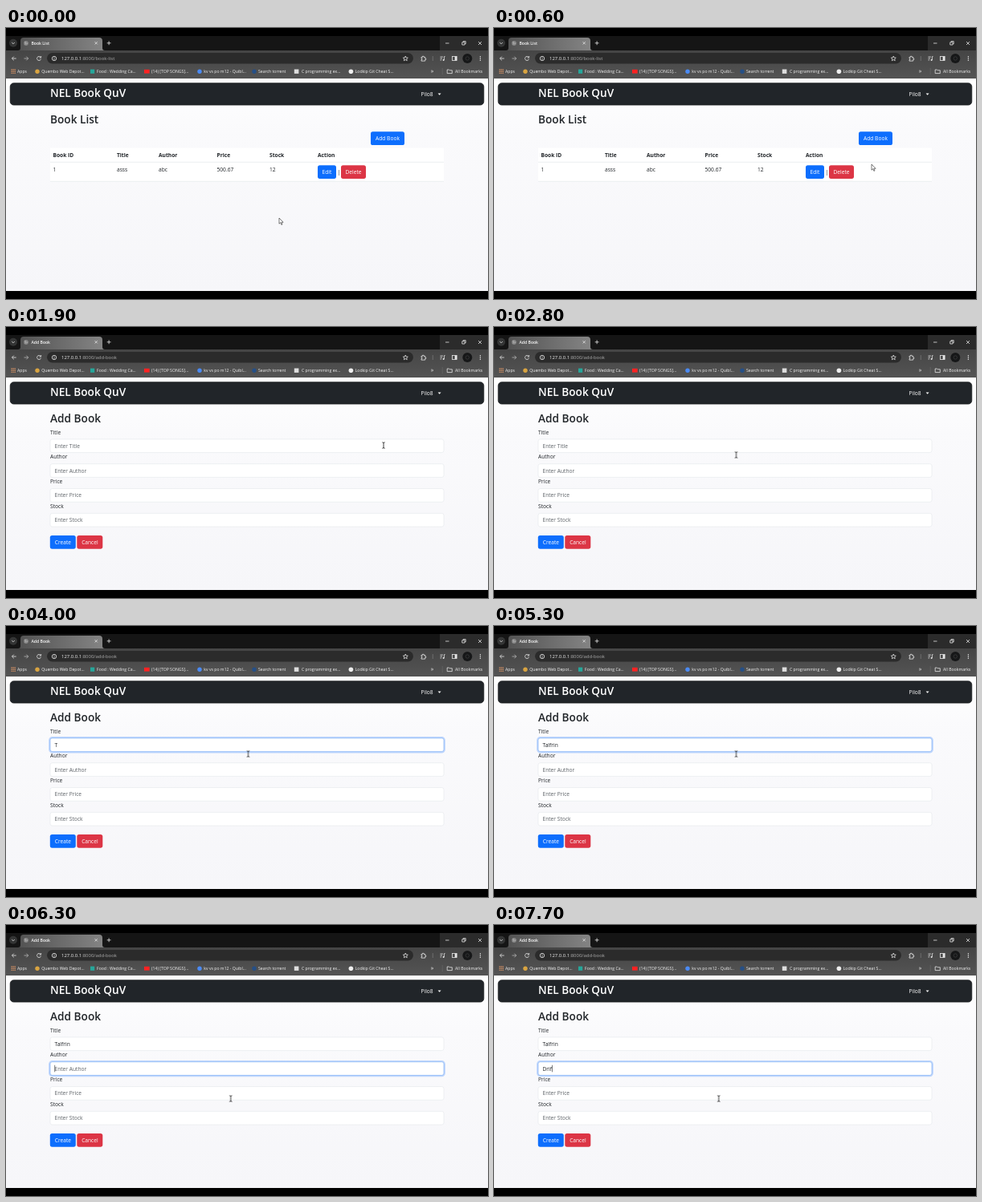
An HTML page for the animation above (8000 ms loop, 600x338 px).

```html
<!DOCTYPE html>
<html lang="en">
<head>
<meta charset="utf-8">
<title>Book form</title>
<style>
  html, body { margin: 0; width: 100%; height: 100%; overflow: hidden; background: #000; }
  svg { display: block; width: 100%; height: 100%; }
  text { font: 6.65px "Open Sans", "Noto Sans", sans-serif; fill: #212529; white-space: pre; }
  .h { font-size: 13.65px; font-weight: 600; }
  .b { font-weight: 700; }
  .w, .btn text { fill: #fff; }
  .btn text { text-anchor: middle; }
  .bar text { font-size: 5.15px; font-weight: 500; fill: #f2f2f2; }
  .url { font-size: 5.95px; fill: #f0f0f0; }
  .dim { fill: #adadad; }
  .tab { font-size: 5.1px; font-weight: 600; fill: #f6f6f6; }
  .hint { fill: #5d6267; }
  .icon { fill: none; stroke: #e6e6e6; stroke-width: .8; }
  .field { fill: #fff; stroke: #dee2e6; stroke-width: .5; }
  .ring { fill: none; stroke: #86b7fe; stroke-width: .6; opacity: 0; }
  .blue { fill: #0d6efd; }
  .red { fill: #dc3545; }

  .list, .form, .arrow, .hand, .beam, #caret { animation: 8s step-end infinite; }
  .list { animation-name: list; }
  .form { animation-name: form; }
  .arrow { animation-name: arrow; }
  .hand { animation-name: hand; }
  .beam { animation-name: form; }
  #caret { animation-name: blink; }
  .pointer { animation: move 8s linear infinite; }
  .add { animation: hover 8s linear infinite; }
  .ring1 { animation: focus1 8s linear infinite; }
  .ring2 { animation: focus2 8s linear infinite; }

  @keyframes list { 0% { visibility: visible } 21.25%, 100% { visibility: hidden } }
  @keyframes form { 0% { visibility: hidden } 21.25%, 100% { visibility: visible } }
  @keyframes arrow { 0% { visibility: visible } 14%, 100% { visibility: hidden } }
  @keyframes hand { 0% { visibility: hidden } 14% { visibility: visible } 21.25%, 100% { visibility: hidden } }
  @keyframes blink {
    0%, 42.5%, 50%, 66.25%, 90% { opacity: 0 }
    38.75%, 46.25%, 62.5%, 70%, 92.5%, 100% { opacity: 1 }
  }
  @keyframes move {
    0%, .6% { transform: translate(340px, 237px) }
    7.5%, 11.5% { transform: translate(470px, 170px) }
    16.25%, 25% { transform: translate(470px, 143px) }
    28.75%, 68.9% { transform: translate(301.5px, 155px) }
    70%, 71.5% { transform: translate(294px, 177px) }
    73.75%, 100% { transform: translate(279.7px, 212px) }
  }
  @keyframes hover { 0%, 14% { fill: #0d6efd } 16%, 19.9% { fill: #0b5ed7 } 20%, 100% { fill: #0a58ca } }
  @keyframes focus1 { 0%, 37% { opacity: 0 } 38.75%, 75.5% { opacity: 1 } 77.2%, 100% { opacity: 0 } }
  @keyframes focus2 { 0%, 75.5% { opacity: 0 } 77.5%, 100% { opacity: 1 } }
</style>
</head>
<body>
<svg viewBox="0 0 600 338" preserveAspectRatio="none">
  <defs>
    <linearGradient id="paper" x2="0" y2="1">
      <stop stop-color="#fff"/><stop offset=".25" stop-color="#fafafc"/><stop offset="1" stop-color="#f6f6f9"/>
    </linearGradient>
    <linearGradient id="toolbar" x2="0" y2="1">
      <stop stop-color="#454545"/><stop offset="1" stop-color="#545454"/>
    </linearGradient>
    <linearGradient id="tabFill"><stop stop-color="#525252"/><stop offset="1" stop-color="#858585"/></linearGradient>
  </defs>
  <rect width="600" height="338"/>

  <!-- Browser window -->
  <g class="bar">
    <rect y="10" width="600" height="19" fill="#151515"/>
    <rect x="540" y="10" width="60" height="18" fill="#2b2b2b"/>
    <rect y="28" width="600" height="35" fill="url(#toolbar)"/>
    <path d="M15 28q3 0 3-3V16q0-4 4-4h94q4 0 4 4v9q0 3 3 3z" fill="url(#tabFill)"/>
    <circle cx="9" cy="18.7" r="5" fill="#343535"/>
    <path class="icon" d="M7.2 18l1.8 1.8 1.8-1.8M110.6 17.2l3.2 3.2m0-3.2l-3.2 3.2M125.7 18.8h4.8m-2.4-2.4v4.8M547 19h4.5M567.8 17.8h3.2V21h-3.2zM569 17.6v-1h3.2v3.2h-1M588 17l4 4m0-4l-4 4"/>
    <circle cx="25" cy="19" r="2.9" fill="#858585"/>
    <path d="M23 17.5l2 .6-.3 1.7-1.4.2M25.5 20l1.7-1.2" class="icon" style="stroke:#b9b9b9"/>
    <rect x="51" y="31" width="456" height="13.5" rx="6.75" fill="#2b2b2b"/>
    <path class="icon" d="M12.7 38H7.5m2.3-2.4L7.4 38l2.4 2.4"/>
    <path class="icon" style="stroke:#b5b5b5" d="M22.5 38h5.2m-2.4-2.4l2.4 2.4-2.4 2.4"/>
    <path class="icon" d="M43 36.4a2.5 2.5 0 1 0 .5 2.2M43.6 35v2h-2"/>
    <circle cx="60" cy="38" r="2.7" class="icon"/><path class="icon" d="M60 37.6v2M60 36.2v.7"/>
    <path class="icon" d="M497.3 35l.9 2 2.1.2-1.6 1.4.5 2.1-1.9-1.1-1.9 1.1.5-2.1-1.6-1.4 2.1-.2z"/>
    <path class="icon" d="M517 36.3h1.5v-1h1.6v1h1.6v1.6h1v1.6h-1v1.6H517v-1.6h.8v-1.6h-.8z"/>
    <path d="M531.3 35v6" stroke="#858585" stroke-width=".6"/>
    <path class="icon" d="M540.5 36h3.4m-3.4 2h2.5m-2.5 2h1.6m3.3 0v-4.4h1.2"/><circle cx="544.6" cy="40" r="1" fill="#e6e6e6"/>
    <rect x="555.5" y="35.5" width="5.6" height="5" class="icon"/><rect x="558.7" y="35.5" width="2.4" height="5" fill="#e6e6e6"/>
    <circle cx="574.3" cy="38" r="6" fill="#161718"/><circle cx="574.3" cy="38" r="2.2" fill="none" stroke="#4d4d4d" stroke-width=".5"/>
    <g fill="#e6e6e6"><circle cx="590.4" cy="35.7" r=".7"/><circle cx="590.4" cy="38" r=".7"/><circle cx="590.4" cy="40.3" r=".7"/></g>

    <path d="M6.5 54.2h5.4M6.5 52h5.4M6.5 56.4h5.4" stroke="#c78b62" stroke-width="1.4" stroke-dasharray="1.4 .6"/>
    <text x="14" y="56">Apps</text>
    <circle cx="39" cy="54.2" r="2.7" fill="#d9a441"/><text x="44.3" y="56">Quembo Web Depot...</text>
    <rect x="105" y="51.6" width="5.2" height="5.2" fill="#26a69a"/><text x="113" y="56">Food : Wedding Ca...</text>
    <rect x="172" y="51.8" width="6.6" height="4.8" fill="#f22"/><text x="181" y="56">(14) [TOP SONGS]...</text>
    <circle cx="241" cy="54.2" r="2.7" fill="#4b8bf4"/><text x="246.3" y="56">kv vs po m12 - Quibl...</text>
    <circle cx="309" cy="54.2" r="2.7" fill="#254f86"/><text x="314" y="56">Search torrent</text>
    <rect x="358.8" y="51.5" width="5.6" height="5.4" fill="#ddd"/><text x="368" y="56">C programming ex...</text>
    <circle cx="429.4" cy="54.2" r="2.8" fill="#eee"/><text x="434.7" y="56">Lodkip Git Cheat S...</text>
    <text x="528.8" y="56" style="font-size:7px">»</text>
    <path d="M543.2 50v8.5" stroke="#707070" stroke-width=".5"/>
    <path class="icon" d="M549.2 52h2.3l.8.8h3v3.8h-6.1z"/><text x="559" y="56">All Bookmarks</text>
  </g>

  <!-- Page -->
  <rect y="63" width="600" height="265" fill="url(#paper)"/>
  <rect x="5.2" y="68.7" width="589.6" height="27.4" rx="4.4" fill="#212529" stroke="#101315" stroke-width=".7"/>
  <text class="h w" x="55" y="86.2">NEL Book QuV</text>
  <text class="w" x="516.5" y="85">Pilo8</text>
  <path d="M537.6 81.6h4l-2 2.1z" fill="#fff"/>

  <g class="list">
    <text class="tab" x="31.5" y="20.8">Book List</text>
    <text class="url" x="69" y="40.1">127.0.0.1<tspan class="dim">:8000/book-list</tspan></text>
    <text class="h" x="55" y="118.9">Book List</text>
    <g class="btn">
      <rect class="add" x="454" y="129.3" width="42" height="16.7" rx="2.6"/>
      <text x="475" y="140.2">Add Book</text>
    </g>
    <rect x="55" y="149.5" width="490" height="42" fill="#fff"/>
    <path d="M55 167.3h490M55 191.3h490" stroke="#dee2e6" stroke-width=".6"/>
    <g id="table"></g>
    <g class="btn">
      <rect class="blue" x="388" y="171.2" width="23" height="16.7" rx="2.6"/><text x="399.5" y="182.1">Edit</text>
      <rect class="red" x="417" y="171.2" width="31" height="16.7" rx="2.6"/><text x="432.5" y="182.1">Delete</text>
    </g>
    <text x="412.4" y="182">|</text>
  </g>

  <g class="form">
    <text class="tab" x="31.5" y="20.8">Add Book</text>
    <text class="url" x="69" y="40.1">127.0.0.1<tspan class="dim">:8000/add-book</tspan></text>
    <text class="h" x="55" y="118.9">Add Book</text>
    <g id="fields"></g>
    <g class="btn">
      <rect class="blue" x="54.8" y="260" width="32" height="16.7" rx="2.6"/><text x="70.9" y="270.9">Create</text>
      <rect class="red" x="88.3" y="260" width="32" height="16.7" rx="2.6"/><text x="104.4" y="270.9">Cancel</text>
    </g>
    <rect id="caret" width=".6" height="8.6" fill="#212529"/>
  </g>

  <g class="pointer">
    <path class="arrow" d="M0 0v7.2l1.7-1.5 1.2 2.7 1.1-.5-1.2-2.6h2.3z" fill="#fff" stroke="#222" stroke-width=".6"/>
    <path class="hand" d="M-.9.7q.9-1.2 1.7 0v3l3 .7q.7.3.6 1.2l-.6 3.9h-4.6l-2.5-3.3q.3-1.1 1.4-.6l1 .7z" fill="#fff" stroke="#222" stroke-width=".6"/>
    <path class="beam" d="M-1.6.8q1.6 0 1.6.9 0-.9 1.6-.9M0 1.5v6.2M-1.6 8.3q1.6 0 1.6-.9 0 .9 1.6.9" fill="none" stroke="#111" stroke-width=".8"/>
  </g>
</svg>
<script>
  const LOOP = 8000;
  const $ = id => document.getElementById(id);
  const columns = [[58.5, 'Book ID', '1'], [138, 'Title', 'asss'], [190, 'Author', 'abc'],
    [262.5, 'Price', '500.67'], [328, 'Stock', '12'], [388, 'Action', '']];
  $('table').innerHTML = columns.map(([x, head, cell]) =>
    `<text class="b" x="${x}" y="160.9">${head}</text><text x="${x}" y="179.4">${cell}</text>`).join('');

  const fieldY = i => 139.9 + 30.83 * i;
  const box = (i, cls, grow = 0) => `<rect class="${cls}" x="${55 - grow}" y="${fieldY(i) - grow}"
    width="${490 + 2 * grow}" height="${16.7 + 2 * grow}" rx="${2.6 + grow}"/>`;
  const ring = i => `<g class="ring ring${i + 1}">${box(i, '')}
    <g stroke="#0d6efd" stroke-opacity=".25" stroke-width="1.7">${box(i, '', 1)}</g></g>`;
  $('fields').innerHTML = ['Title', 'Author', 'Price', 'Stock'].map((name, i) =>
    `<text x="55" y="${fieldY(i) - 6.3}">${name}</text>${box(i, 'field')}${i < 2 ? ring(i) : ''}
     <text class="hint" id="in${name}" x="60.5" y="${fieldY(i) + 10.8}">Enter ${name}</text>`).join('');

  // Each entry in `keys` is the moment one more letter appears.
  const inputs = [
    { el: $('inTitle'), hint: 'Enter Title', word: 'Talfrin', keys: [4000, 4100, 4300, 4400, 4600, 4700, 5000] },
    { el: $('inAuthor'), hint: 'Enter Author', word: 'Drif', keys: [6800, 7400, 7500, 7600] }
  ];
  let start;

  function draw(now) {
    start ??= now;
    const t = (now - start) % LOOP;
    const active = t < 6100 ? 0 : 1;
    inputs.forEach(({ el, hint, word, keys }, i) => {
      const typed = word.slice(0, keys.filter(k => k <= t).length);
      el.textContent = typed || hint;
      el.classList.toggle('hint', !typed);
      if (i === active) {
        $('caret').setAttribute('x', 60.5 + (typed ? el.getComputedTextLength() : 0));
        $('caret').setAttribute('y', fieldY(i) + 4);
      }
    });
    requestAnimationFrame(draw);
  }
  requestAnimationFrame(draw);
</script>
</body>
</html>
```
